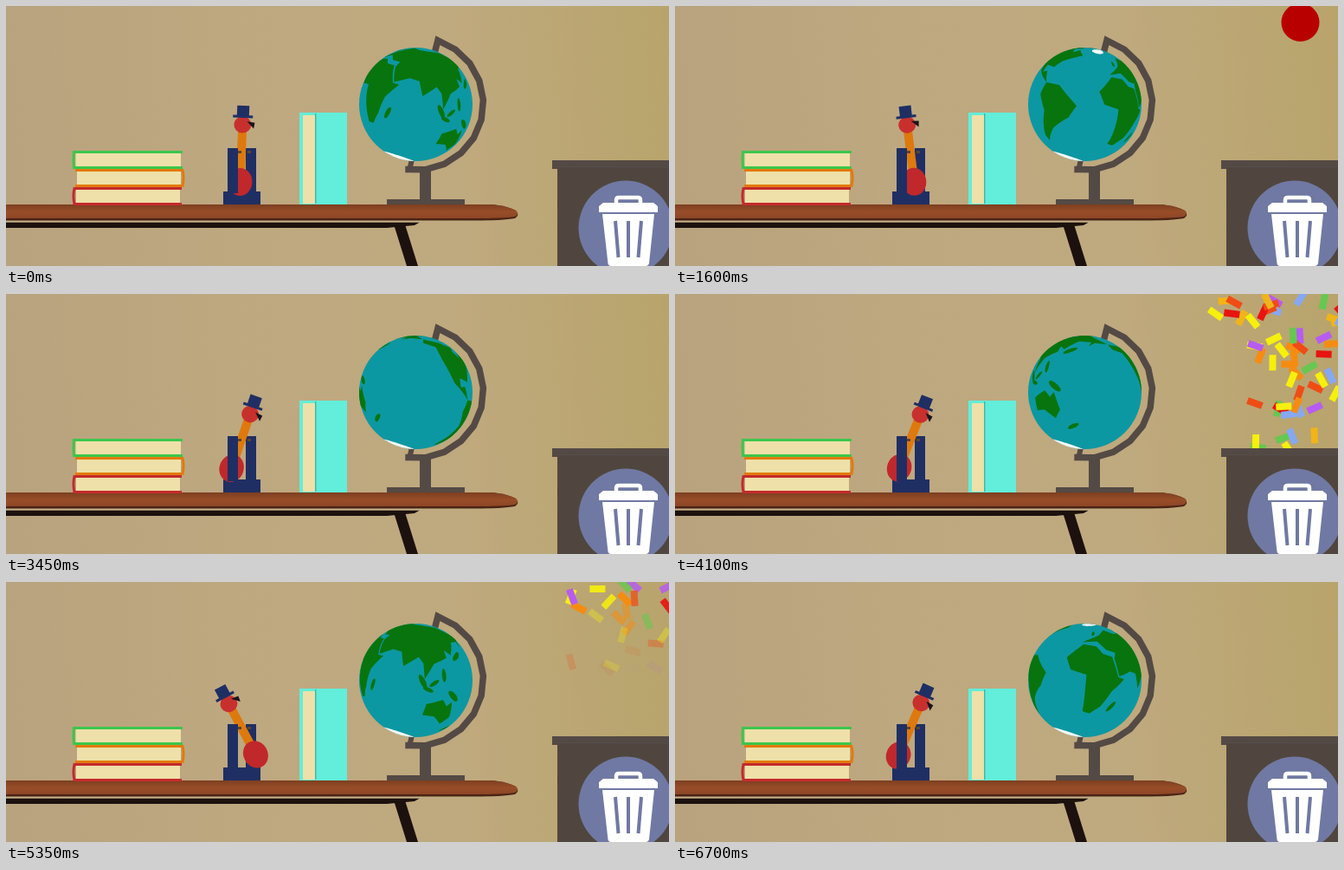
Animation of 766 by 300 pixels, one loop 6.75 s. Source, as an HTML page with a canvas:

```html
<!DOCTYPE html>
<html lang="en">
<head>
<meta charset="utf-8">
<title>Desk with globe and drinking bird</title>
<style>
  html, body { margin: 0; width: 100%; height: 100%; overflow: hidden; background: #bca67c; }
  canvas { display: block; }
</style>
</head>
<body>
<canvas id="stage" width="766" height="300"></canvas>
<script>
const ctx = document.getElementById('stage').getContext('2d');
const LOOP = 6750, STEP = 50, RAD = Math.PI / 180;
const NAVY = '#1f2f64', GREY = '#544a45', CREAM = '#eee0a8', DARK = '#1c110e';
const BADGE = '#7079a3', LAND = '#08740d', ICE = '#f4f6f4';

// ---- drawing helpers ----
function rect(x, y, w, h, color) {
  ctx.fillStyle = color;
  ctx.fillRect(x, y, w, h);
}

function oval(x, y, rx, ry, color) {
  ctx.fillStyle = color;
  ctx.beginPath();
  ctx.ellipse(x, y, rx, ry, 0, 0, 7);
  ctx.fill();
}

function trace(points) {
  ctx.beginPath();
  points.forEach(([x, y]) => ctx.lineTo(x, y));
}

function shape(points, color) {
  trace(points);
  ctx.fillStyle = color;
  ctx.fill();
}

function line(path, width, color) {
  ctx.strokeStyle = color;
  ctx.lineWidth = width;
  ctx.stroke(new Path2D(path));
}

function fill(path, color) {
  ctx.fillStyle = color;
  ctx.fill(new Path2D(path));
}

function blend(x0, y0, x1, y1, ...colors) {
  const g = ctx.createLinearGradient(x0, y0, x1, y1);
  colors.forEach((c, i) => g.addColorStop(i / (colors.length - 1), c));
  return g;
}

// ---- room ----
const wall = blend(0, 60, 766, 0, '#b9a37e', '#bea880', '#bfa97e', '#b8a46b');
const wood = blend(0, 229, 0, 246, '#7d3f20', '#984d28', '#8c4525');

function table() {
  fill('M0 249.500H478L472 253L440 256H0Z', DARK);
  fill('M448 252H461L476 300H463Z', DARK);
  rect(0, 247.5, 480, 2, '#c4ad88');
  fill('M0 229H562Q580 231 589 236Q594 241 588 245Q575 247.500 540 247.500H0Z', '#4a2416');
  fill('M0 229H562Q580 231 589 236Q593 240 588 243Q575 245 540 245H0Z', wood);
}

function book(y, color, spine, bulge, end) {
  rect(Math.min(spine, end) + 2, y + 2, Math.abs(end - spine) - 4, 17, CREAM);
  line(`M${end} ${y + 1.5}H${spine}Q${spine + bulge} ${y + 10} ${spine} ${y + 19.5}H${end}`, 3, color);
}

function books() {
  book(167, '#3cc64c', 78.5, -1, 204);
  book(188, '#e27a0c', 204, 2, 80);
  book(209, '#c42a2e', 79, -2, 203);
}

function box() {
  rect(339, 123, 55, 106, '#62eedb');
  rect(343, 126, 14, 102, CREAM);
  rect(357, 124, 1.5, 104, '#3fb9ae');
}

function cabinet() {
  rect(631, 178, 135, 10, GREY);
  rect(637, 187, 129, 113, '#50463f');
  oval(716, 256, 54.5, 54.5, BADGE);
  line('M705 229V224Q705 221 708 221H730Q733 221 733 224V229', 4.5, '#fff');
  fill('M690 227H748L753 231V238H685V231Z', '#fff');
  fill('M689 240H749L743 297Q742 300 739 300H699Q696 300 695.500 297Z', '#fff');
  for (const lean of [-1, 0, 1]) {
    const x = 719 + lean * 15;
    line(`M${x} 248L${x - lean * 3.5} 290`, 4, BADGE);
  }
}

// ---- globe: key points of the coasts as lon, lat in degrees ----
const coasts = {
  africa: [-17,15, -6,35, 10,37, 20,31, 32,31, 43,12, 51,12, 40,-4, 35,-22, 27,-34, 18,-34, 9,4, -8,4],
  eurasia: [-9,37, -2,44, 8,54, 14,68, 41,67, 104,78, 140,73, 190,66, 163,60, 157,51, 156,59, 135,54,
    128,36, 118,39, 122,31, 108,20, 103,2, 97,17, 90,22, 78,8, 70,22, 59,22, 44,13, 35,30, 36,37, 23,37, 9,44],
  northAmerica: [-168,66, -128,70, -82,68, -94,60, -80,53, -76,61, -56,52, -76,36, -81,26, -97,27,
    -95,18, -87,20, -78,8, -105,20, -124,42, -135,58, -160,58],
  southAmerica: [-78,8, -60,9, -35,-6, -40,-20, -57,-36, -69,-54, -75,-48, -71,-20, -81,-5],
  australia: [114,-22, 130,-12, 138,-17, 142,-11, 153,-27, 148,-38, 131,-32, 116,-35]
};

// lon, lat, half length, slant
const isles = [
  [47, -19, 7, 70], [-2, 54, 4, 100], [138, 37, 8, 50], [114, 1, 6, 50],
  [102, -1, 8, -45], [110, -7, 6, -5], [141, -5, 9, -20], [122, 12, 7, -70], [173, -41, 7, 50]
];

function ellipse(lon, lat, size, slant, ratio = 0.35) {
  const out = [], c = Math.cos(slant * RAD), s = Math.sin(slant * RAD);
  for (let a = 0; a < 2 * Math.PI; a += Math.PI / 5) {
    const p = size * Math.cos(a), q = size * ratio * Math.sin(a);
    out.push(lon + (p * c - q * s) / Math.cos(lat * RAD), lat + p * s + q * c);
  }
  return out;
}

const land = [...Object.values(coasts), ...isles.map(i => ellipse(...i))];
const ice = [
  ellipse(-40, 73, 9, 90, 0.6),
  Array.from({ length: 48 }, (_, i) => i % 2 ? -74 : i * 7.5 - 180)
];

const GLOBE = { x: 473.5, y: 113.5, r: 65.5 }, TILT = 18 * RAD, PITCH = 2 * RAD;

function project(lon, lat, middle) {
  const a = (lon - middle) * RAD, c = Math.cos(lat * RAD), h = Math.sin(lat * RAD), z = c * Math.cos(a);
  let u = c * Math.sin(a), v = h * Math.cos(PITCH) + z * Math.sin(PITCH);
  const front = z * Math.cos(PITCH) >= h * Math.sin(PITCH);
  if (!front) {                       // far side collapses onto the rim
    const d = Math.hypot(u, v) || 1;
    u /= d; v /= d;
  }
  return {
    front,
    x: GLOBE.x + GLOBE.r * (u * Math.cos(TILT) + v * Math.sin(TILT)),
    y: GLOBE.y + GLOBE.r * (u * Math.sin(TILT) - v * Math.cos(TILT))
  };
}

function region(coords, middle, color) {
  const pts = [], n = coords.length, cuts = 6;
  for (let i = 0; i < n; i += 2) {
    let dLon = coords[(i + 2) % n] - coords[i];
    if (dLon < -180) dLon += 360;
    const dLat = coords[(i + 3) % n] - coords[i + 1];
    for (let k = 0; k < cuts; k++)
      pts.push(project(coords[i] + dLon * k / cuts, coords[i + 1] + dLat * k / cuts, middle));
  }
  if (pts.some(p => p.front)) shape(pts.map(p => [p.x, p.y]), color);
}

function stand() {
  rect(440, 223, 90, 6, GREY);
  rect(478, 190, 13, 34, GREY);
  const arm = [[495, 55]];
  for (let a = -71; a <= 99; a += 17)
    arm.push([GLOBE.x + 78 * Math.cos(a * RAD), GLOBE.y - 1 + 77 * Math.sin(a * RAD)]);
  trace(arm);
  ctx.strokeStyle = GREY;
  ctx.lineWidth = 7.5;
  ctx.stroke();
  line('M469 177L466 190', 6, GREY);
}

function globe(t) {
  const middle = 74 - 63.4 * t;
  stand();
  oval(GLOBE.x, GLOBE.y, GLOBE.r, GLOBE.r, '#0c98a2');
  land.forEach(c => region(c, middle, LAND));
  ice.forEach(c => region(c, middle, ICE));
}

// ---- drinking bird ----
const swing = t => 27 * Math.cos((116 * (t - 4.1) + 33) * RAD) - 1;

function bird(t) {
  rect(277, 164, 12, 52, NAVY);
  rect(251, 214, 43, 15, NAVY);
  ctx.save();
  ctx.translate(272, 168);
  ctx.rotate(swing(t) * RAD);
  rect(-5, -26, 10, 50, '#de790d');
  oval(0, 35, 14, 16, '#c0282c');
  oval(0, -31, 10, 9.5, '#c8302e');
  shape([[5, -35], [14, -34], [13, -27]], '#17151c');
  rect(-7, -53, 14, 12, NAVY);
  rect(-11.5, -42, 23, 3, NAVY);
  ctx.restore();
  rect(256, 164, 12, 52, NAVY);
  rect(268, 167, 4, 3, '#5a4630');
  rect(279, 167, 4, 3, '#5a4630');
}

// ---- ball and confetti ----
function ball(t) {
  const s = t - 1.6;
  oval(722.5, 19 + 80 * s + 12.5 * s * s, 22, 22, '#b80000');
}

const BURST = { x: 713, y: 185, start: 3.5, ref: 0.6, rise: 22, count: 60 };
const palette = ['#f6f00c', '#f58c12', '#ef4c16', '#86a8f4', '#b75cf2', '#f6f00c', '#66c850', '#e81410', '#f0b418'];

let seed = 11;
const rand = () => (seed = seed * 16807 % 2147483647) / 2147483647;

// dx and up: distance covered 0.6 s after the burst
const bits = Array.from({ length: BURST.count }, (_, i) => {
  const reach = Math.pow(rand(), 0.6);
  return {
    color: palette[i % palette.length],
    dx: (rand() * 2 - 1) * (40 + 58 * reach),
    up: 180 * reach - 8,
    angle: rand() * 180, spin: (rand() - 0.5) * 140,
    life: 1.35 + reach * 1.2 + rand() * 0.4
  };
});

const drag = (s, k) => (1 - Math.exp(-k * s)) / (1 - Math.exp(-k * BURST.ref));

function confetti(t) {
  const s = t - BURST.start;
  if (s <= 0) return;
  for (const b of bits) {
    const alpha = Math.min(1, (b.life - s) / 0.6);
    if (alpha <= 0) continue;
    ctx.save();
    ctx.globalAlpha = alpha;
    ctx.translate(BURST.x + b.dx * drag(s, 2), BURST.y - b.up * drag(s, 3.5) - BURST.rise * s);
    ctx.rotate((b.angle + b.spin * (s - BURST.ref)) * RAD);
    rect(-9, -4, 18, 8, b.color);
    ctx.restore();
  }
}

function draw(ms) {
  const t = Math.floor(ms % LOOP / STEP) * STEP / 1000;
  rect(0, 0, 766, 300, wall);
  table();
  books();
  bird(t);
  box();
  globe(t);
  ball(t);
  confetti(t);
  cabinet();
}

const begin = performance.now();
function tick() {
  draw(performance.now() - begin);
  requestAnimationFrame(tick);
}
tick();
</script>
</body>
</html>
```
